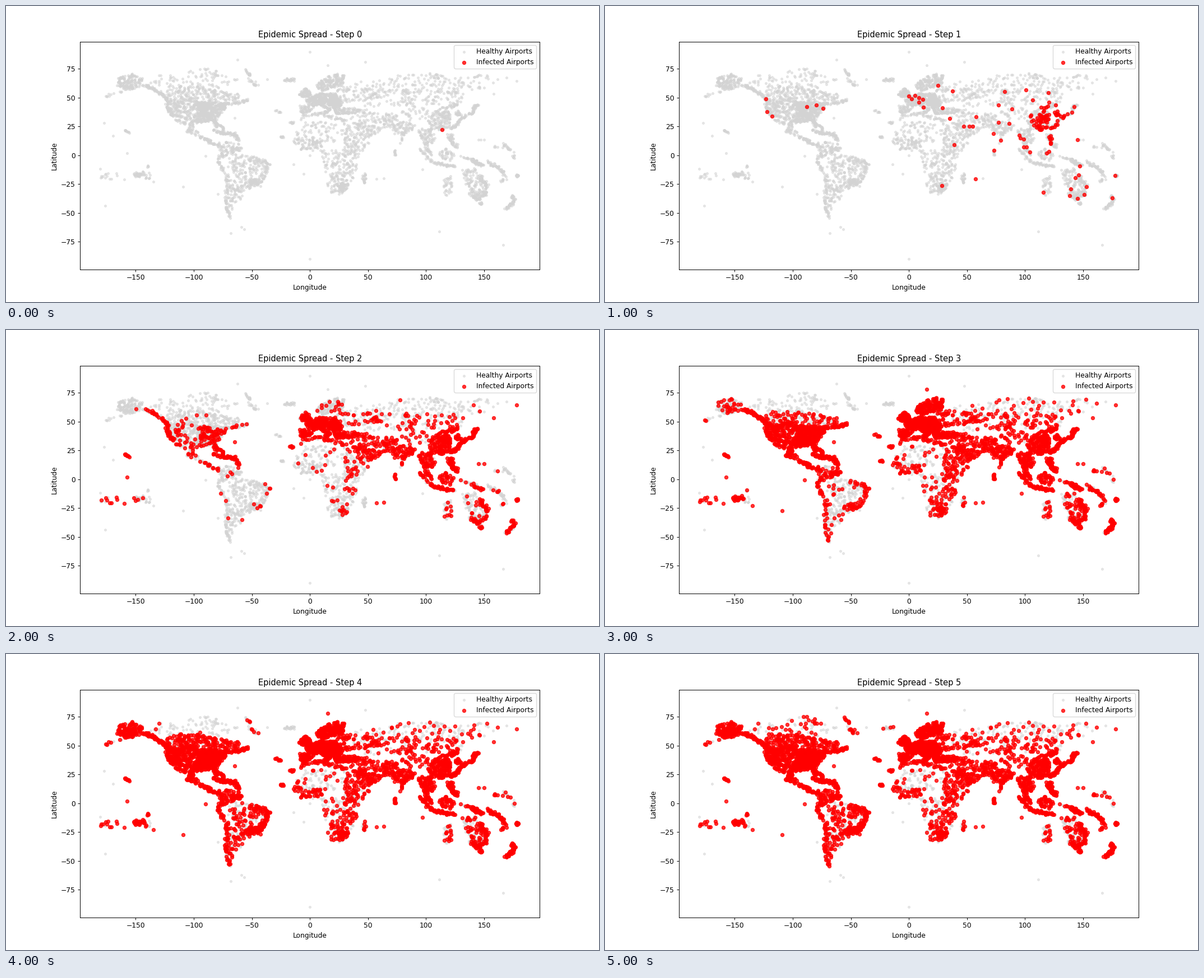
These frames come from a looping animation (1058 px wide and 529 px high, 6 s). A matplotlib script:

```python
import numpy as np
import matplotlib.pyplot as plt
from matplotlib.animation import FuncAnimation
from matplotlib.path import Path

STEPS = 6
DPI = 88
ORIGIN = 114, 22.3
rng = np.random.default_rng(11)
places, infected_at = [], []


def spots(step, *coords):
    """Single airports, all infected at the same step."""
    pts = np.reshape(coords, (-1, 2))
    places.append(pts)
    infected_at.append(np.full(len(pts), step))


def spread(pts, pace, reach):
    """Infection arrives around step `pace` and hits a share `reach`."""
    step = np.maximum(2, np.ceil(rng.normal(pace, .5, len(pts))))
    step[rng.random(len(pts)) > reach] = STEPS
    places.append(pts)
    infected_at.append(step)


def area(n, pace, reach, *outline):
    poly = np.reshape(outline, (-1, 2))
    trial = rng.uniform(poly.min(0), poly.max(0), (20 * n, 2))
    spread(trial[Path(poly).contains_points(trial)][:n], pace, reach)


def chain(n, pace, reach, *line, width=.7):
    """Airports along a coast or a row of islands."""
    line = np.reshape(line, (-1, 2))
    dist = np.r_[0, np.cumsum(np.hypot(*np.diff(line, axis=0).T))]
    at = rng.uniform(0, dist[-1], n)
    pts = np.column_stack([np.interp(at, dist, line[:, k]) for k in (0, 1)])
    spread(pts + rng.normal(0, width, (n, 2)), pace, reach)


def blob(n, pace, reach, lon, lat, w, h):
    spread(rng.normal((lon, lat), (w, h), (n, 2)), pace, reach)


# North America
area(200, 2.5, .97, -124, 49, -117, 33, -108, 31, -97, 27, -97, 49)
area(450, 2.5, .98, -97, 47, -83, 46, -69, 46, -76, 36, -81, 30, -97, 28)
area(200, 3.1, .82, -124, 60, -95, 60, -78, 56, -58, 53, -66, 47, -82, 46, -95, 49, -124, 49)
area(85, 4.4, .4, -138, 68, -90, 77, -62, 66, -75, 58, -95, 60, -138, 60)
area(150, 3.45, .93, -166, 67, -156, 71, -144, 69, -145, 60, -158, 56, -167, 61)
area(55, 2.3, .95, -117, 32, -100, 29, -96, 19, -95, 16, -106, 20)
chain(60, 1.9, 1, -123, 49, -123, 42, -118, 34)
chain(70, 2.4, .95, -145, 61, -135, 58, -127, 52, -123, 49)
chain(10, 3, .5, -158, 56, -168, 54, -177, 52)
chain(35, 1.9, 1, -82, 30, -80.5, 25.5)
chain(30, 2.4, .95, -67, 45, -61, 46, -54, 48)
chain(60, 2.5, .95, -95, 17, -89, 14, -84, 10, -78, 8.5)
chain(70, 2, 1, -84, 22, -73, 19, -65, 18.3, -61, 12)
chain(16, 1.9, 1, -79, 27, -74, 22)
chain(30, 4, .5, -56, 74, -52, 70, -52, 65, -46, 60.5)
chain(22, 5, .3, -23, 65.3, -14, 65.2)

# South America
area(90, 2.8, .88, -80, -4, -77, 8, -72, 12, -61, 10, -58, 5, -70, 0)
area(170, 3.5, .55, -72, -10, -68, 2, -50, 0, -36, -5, -40, -20, -48, -27, -57, -31, -62, -20)
area(85, 3.7, .5, -70, -18, -57, -28, -58, -37, -66, -42, -69, -54, -73, -48, -71, -32)
chain(45, 2.9, .93, -48, -2, -36, -7, -40, -21, -49, -27)
chain(70, 3, .82, -80, -4, -71, -18, -72.5, -42, -69, -54)
blob(45, 3.2, .9, -48, -23, 2.6, 1.6)

# Europe
area(400, 2, .98, -4, 48, 2, 51, 8, 54, 22, 54, 28, 46, 26, 41, 21, 39, 19, 42,
     13, 45, 8, 44, 3, 43, -1, 43.5)
area(45, 1.8, .97, -9, 37, -9, 43.4, 3, 42, -1, 37)
area(75, 2.2, .97, -10, 52, -5, 50, 1, 51, 1, 53, -3, 59, -8, 55)
area(85, 1.8, .98, 21, 40, 30, 41, 43, 41, 43, 37, 28, 36, 22, 36)
area(180, 2.7, .97, 6, 58, 5, 62, 14, 68, 24, 71, 30, 70, 29, 61, 17, 58, 12, 55)
area(80, 2.1, .7, 28, 46, 22, 54, 26, 60, 58, 58, 60, 51, 40, 45)
chain(45, 1.8, 1, 9, 45, 13, 42, 17, 40, 13, 37.5)

# Asia
area(165, 2.5, .2, 32, 62, 60, 68, 105, 72, 140, 71, 178, 68, 150, 58, 120, 54, 60, 55)
area(130, 2, .6, 46, 42, 48, 51, 60, 58, 85, 57, 135, 56, 130, 45, 85, 44)
area(125, 1.8, .88, 35, 32, 43, 41, 60, 37, 62, 25, 58, 18, 44, 13, 39, 20)
area(125, 1.7, .93, 62, 25, 62, 36, 74, 38, 77, 31, 92, 27, 87, 21, 80, 14, 78, 8, 73, 18, 70, 23)
area(175, 1.5, .97, 102, 23, 110, 21, 121, 25, 121, 36, 117, 40, 124, 41, 130, 47, 108, 40, 102, 32)
area(40, 1.9, .75, 74, 38, 84, 47, 103, 40, 102, 28, 86, 30)
area(75, 1.6, .95, 91, 24, 105, 23, 108, 14, 104, 9, 99, 8, 95, 17)
area(40, 1.7, .9, 109, 1, 117, 6, 125, 1.5, 122, -5, 116, -3, 110, -2)
area(60, 2.3, .6, 127, 0, 141, -3, 151, -9, 143, -8, 138, -4)
chain(20, 1.7, 1, 99, 8, 104, 1.5)
chain(65, 1.8, .95, 95, 5, 105, -5.5, 115, -8.3, 125, -9.5)
chain(48, 1.7, .97, 120.5, 18, 122, 12, 126, 7, width=1)
chain(85, 1.6, 1, 120.5, 23, 125, 24.8, 130, 32, 136, 35, 140.5, 37, 142, 43, 145, 43.5)
chain(10, 1.7, 1, 73, 7, 73.2, -.7, width=.3)
blob(24, 1.6, 1, 127.6, 36, .9, 1.1)

# Africa
area(80, 2.4, .12, -16, 16, -8, 30, 32, 28, 32, 12, -10, 11)
area(75, 2.6, .48, -17, 15, 10, 13, 10, 4, -8, 5)
area(65, 2.6, .3, 9, 4, 30, 5, 30, -12, 13, -13)
area(125, 2.2, .52, 32, 30, 37, 20, 44, 12, 51, 11, 40, -3, 40, -14, 30, -12, 29, 12)
area(110, 2.6, .42, 12, -14, 35, -13, 40, -16, 33, -27, 28, -33, 19, -34, 15, -27)
area(24, 2.9, .5, 44, -18, 50, -13, 47, -25)
chain(55, 1.95, .8, -9, 30, -6, 35, 10, 36.5, 20, 32, 31, 31)
blob(40, 2.2, .75, 28.5, -27, 2.2, 2.2)

# Oceania
area(34, 2, .45, 114, -22, 123, -17, 122, -34, 116, -35)
area(115, 2.2, .36, 131, -12, 142, -11, 146, -19, 153, -27, 150, -37, 144, -38, 136, -34)
chain(85, 2, .9, 145, -17, 152, -26, 151, -33, 145, -38, 139, -35, width=.9)
chain(50, 2.1, 1, 174, -36, 176.5, -39, 169, -46)
chain(45, 2.8, .85, 150, -5, 160, -9, 167, -15, 169, -20)
chain(22, 2.6, .2, 166, 9, 172, 6, 176, -2, width=1)
chain(8, 2.4, .8, 145, 15, 158, 7, 171, 7)
chain(14, 1.5, 1, -159.8, 22, -155, 19.6, width=.3)
blob(9, 2, 1, 147, -42, .8, .6)
blob(8, 2.2, .8, 165.5, -21.5, .9, .6)
blob(12, 1.9, 1, 178.6, -17.6, .6, .8)
blob(14, 2.1, .8, -175, -17, 3.5, 2.2)
blob(26, 2.7, .9, -149, -17, 3.2, 1.2)
blob(14, 3.4, .3, -141, -18, 2.5, 1.5)
blob(4, 3, 1, -139.7, -9.4, .6, .5)

# Atlantic islands
chain(8, 2.6, 1, -31, 39.2, -25, 37.4, width=.3)
blob(9, 1.7, 1, -16, 28.5, 1.2, .5)
blob(9, 2.5, 1, -24, 15.7, .7, .7)

# Remote airports
spots(2, -149.9, 61.1, -157.3, 1.9, -159.8, -21.2, -64.7, 32.3, 178, 64.6,
      158.4, 53.1, 63.5, -20, -77, -12.2, -38.5, -3.8, -34.9, -8.1,
      -43.2, -22.8, -70.6, -33.4, -58.5, -34.8)
spots(3, 15.5, 78.2, -109.4, -27.2, -90, -.6, -134.8, -23, 97, -12.2)
spots(STEPS, 0, 89.5, 0, -90, 0, 0, -14, -8, -5.6, -16, -68, -67.6, -59, -62.2,
      -56.6, -64.3, 111.5, -66.3, 166.7, -77.9, -176.4, -44, -79, -33.7,
      -177.3, 28.2, -169.5, 16.7, -62.2, 82.6, 47.7, 80.9, -37, 65.8)

# Long-haul destinations of the first city
spots(1, -123, 49.1, -122.3, 37.6, -118, 34, -88, 42, -79.5, 43.6, -74, 40.7,
      0, 51.4, 2.5, 49, 5, 52, 8.6, 50, 8.7, 46, 12, 48.2, 12.4, 41.7,
      25, 60.3, 29, 40.9, 37.6, 55.7, 35, 31.9, 38.8, 9, 28.2, -26.1,
      47, 24.9, 52, 25.2, 55, 25, 57.6, -20.4, 82.7, 55, 77, 43.3)
spots(1, 77, 28.4, 73, 19, 79, 13, 73.5, 4.1, 106.8, 47.8, 145, 13.4,
      177.5, -17.8, 175, -37, 146, -17, 147.2, -9.5, 153, -27.3, 151, -34,
      145, -37.7, 138.5, -35, 116, -32)

places = np.vstack(places)
infected_at = np.concatenate(infected_at)

# Short flights: the nearer an airport, the likelier it is reached first
distance = np.hypot(*(places - (118, 28)).T)
weight = np.exp(-distance / 9) * (infected_at > 1)
near = rng.choice(len(places), 95, replace=False, p=weight / weight.sum())
infected_at[near] = 1

places = np.vstack([places, ORIGIN])
infected_at = np.append(infected_at, 0)

fig, ax = plt.subplots(figsize=(1058 / DPI, 529 / DPI), dpi=DPI)
fig.subplots_adjust(left=.125, right=.9, bottom=.11, top=.8795)
ax.set_xlim(-197.87, 197.94)
ax.set_ylim(-98.97, 98.47)
ax.set_xlabel("Longitude")
ax.set_ylabel("Latitude")
healthy = ax.scatter([], [], s=10, c="lightgray", alpha=0.5, label="Healthy Airports")
infected = ax.scatter([], [], s=25, c="red", alpha=0.8, label="Infected Airports")
ax.legend(loc="upper right")
title = ax.set_title("Epidemic Spread - Step 0")


def update(step):
    sick = infected_at <= step
    healthy.set_offsets(places[~sick])
    infected.set_offsets(places[sick])
    title.set_text(f"Epidemic Spread - Step {step}")
    return healthy, infected, title


anim = FuncAnimation(fig, update, frames=STEPS, interval=1000, repeat=True,
                     repeat_delay=0, blit=False)
plt.show()
```
